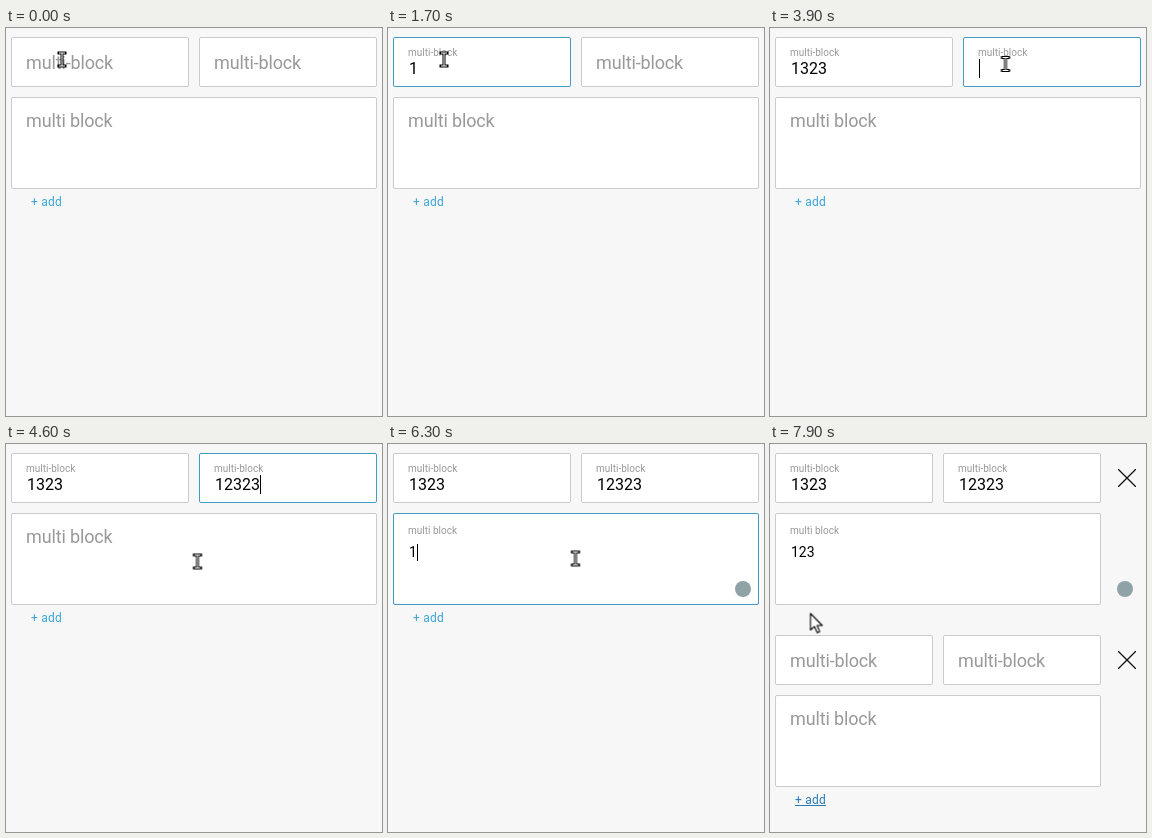
An HTML page for the animation above (8 s loop, 376 px wide and 388 px high).

```html
<!DOCTYPE html>
<html lang="en">
<head>
<meta charset="utf-8">
<title>Multi-block form</title>
<style>
  html, body { margin: 0; width: 100%; height: 100%; overflow: hidden; }
  body { position: relative; background: #f7f7f7; font-family: Roboto, Arial, sans-serif; }

  /* One 8 s clock for everything; states hold unless a keyframe says otherwise. */
  .anim {
    animation: 8s step-end -20ms infinite;
  }

  .block { position: absolute; left: 5px; top: 9px; width: 366px; }
  .block.second { top: 191px; width: 326px; }
  .pair { display: flex; gap: 10px; }
  .field {
    position: relative; flex: 1; box-sizing: border-box; height: 50px;
    background: #fff; border: 1px solid #c8cccc; border-radius: 2px;
  }
  .area { height: 92px; margin-top: 10px; }

  .label {
    position: absolute; left: 14px; top: 15px; line-height: 20px;
    font-size: 18px; letter-spacing: -.14px; white-space: nowrap; color: #999;
  }
  .area .label { top: 13px; }

  /* The typed text is revealed by width; its right border is the caret. */
  .value {
    position: absolute; left: 15px; top: 21px; width: 0; height: 19px;
    overflow: hidden; white-space: nowrap; color: #000;
    font-size: 16px; line-height: 19px; border-right: 1px solid transparent;
  }
  .area .value { top: 30px; height: 17px; font-size: 14px; line-height: 17px; }

  .add {
    position: absolute; left: 25px; top: 164px; line-height: 20px;
    font-size: 12px; letter-spacing: .23px; color: #3ba4d8;
  }
  .badge {
    position: absolute; left: 347px; top: 137px; width: 16px; height: 16px;
    border-radius: 50%; background: #8fa3a6; visibility: hidden;
  }
  .close { position: absolute; left: 343px; top: 16px; width: 18px; height: 18px; }
  .close path { stroke: #111; stroke-width: 1.3; }
  .late { visibility: hidden; animation-name: late; }
  #pointer { position: absolute; left: 0; top: 0; width: 1px; height: 1px; overflow: visible; }
  #pointer path { fill: #fff; stroke: #000; stroke-width: 1.1; stroke-linejoin: round; }
  #ibeam path { fill: none; stroke-width: 3; stroke-linejoin: miter; }
  #ibeam path + path { stroke: #fff; stroke-width: 1; }
  #hand path + path { stroke-width: .8; }

  #form { animation-name: narrow; }
  #first { animation-name: focus1; }
  #first .label { animation-name: float1; }
  #first .value { animation-name: type1; }
  #second { animation-name: focus2; }
  #second .label { animation-name: float2; }
  #second .value { animation-name: type2; }
  #notes { animation-name: focus3; }
  #notes .label { animation-name: float3; }
  #notes .value { animation-name: type3; }
  .badge { animation-name: badge; }
  .add { animation-name: add; }
  #pointer { animation-name: move; }
  #ibeam { animation-name: ibeam; }
  #hand { animation-name: hand; }
  #arrow { animation-name: arrow; }

  @keyframes late { 0% { visibility: hidden } 98.75%, 100% { visibility: visible } }
  @keyframes narrow { 0% { width: 366px } 98.75%, 100% { width: 326px } }
  @keyframes badge { 0% { visibility: hidden } 67.5%, 100% { visibility: visible } }

  @keyframes focus1 {
    0% { border-color: #c8cccc }
    6.25% { border-color: #c8cccc; animation-timing-function: steps(4, start) }
    11.25% { border-color: #419bc5 }
    45% { border-color: #419bc5; animation-timing-function: steps(3, start) }
    48.75%, 100% { border-color: #c8cccc }
  }
  @keyframes focus2 {
    0% { border-color: #c8cccc }
    45% { border-color: #c8cccc; animation-timing-function: steps(4, start) }
    50% { border-color: #419bc5 }
    66.25% { border-color: #419bc5; animation-timing-function: steps(3, start) }
    70%, 100% { border-color: #c8cccc }
  }
  @keyframes focus3 {
    0% { border-color: #c8cccc }
    66.25% { border-color: #c8cccc; animation-timing-function: steps(4, start) }
    71.25% { border-color: #419bc5 }
    98.75%, 100% { border-color: #c8cccc }
  }

  @keyframes float1 {
    0% { top: 15px; font-size: 18px; letter-spacing: -.14px }
    6.25% { top: 15px; font-size: 18px; letter-spacing: -.14px; animation-timing-function: steps(4, start) }
    11.25%, 100% { top: 5px; font-size: 10px; letter-spacing: 0px }
  }
  @keyframes float2 {
    0% { top: 15px; font-size: 18px; letter-spacing: -.14px }
    45% { top: 15px; font-size: 18px; letter-spacing: -.14px; animation-timing-function: steps(4, start) }
    50%, 100% { top: 5px; font-size: 10px; letter-spacing: 0px }
  }
  @keyframes float3 {
    0% { top: 13px; font-size: 18px; letter-spacing: -.14px }
    66.25% { top: 13px; font-size: 18px; letter-spacing: -.14px; animation-timing-function: steps(4, start) }
    71.25%, 100% { top: 7px; font-size: 10px; letter-spacing: 0px }
  }

  /* A digit is .5615em wide. */
  @keyframes type1 {
    0% { width: 0em; border-color: transparent }
    10% { width: 0em; border-color: #000 }
    21.25% { width: .562em; border-color: transparent }
    26.25% { width: 1.123em; border-color: #000 }
    30% { width: 1.685em; border-color: #000 }
    31.25% { width: 2.246em; border-color: #000 }
    35%, 100% { width: 2.246em; border-color: transparent }
  }
  @keyframes type2 {
    0% { width: 0em; border-color: transparent }
    47.5% { width: 0em; border-color: #000 }
    51.25% { width: .562em; border-color: #000 }
    52.5% { width: 1.123em; border-color: #000 }
    53.75% { width: 1.685em; border-color: #000 }
    55% { width: 2.246em; border-color: #000 }
    56.25% { width: 2.808em; border-color: #000 }
    61.25%, 100% { width: 2.808em; border-color: transparent }
  }
  @keyframes type3 {
    0% { width: 0em; border-color: transparent }
    70% { width: 0em; border-color: #000 }
    78.75% { width: .562em; border-color: #000 }
    81.25% { width: 1.123em; border-color: #000 }
    83.75% { width: 1.685em; border-color: #000 }
    87.5%, 100% { width: 1.685em; border-color: transparent }
  }

  @keyframes add {
    0% { top: 164px; color: #3ba4d8; text-decoration: none }
    90% { top: 164px; color: #2a7ab5; text-decoration: underline }
    98.75%, 100% { top: 346px; color: #2a7ab5; text-decoration: underline }
  }

  /* The pointer hides while keys are pressed. */
  @keyframes move {
    0% { transform: translate(56px, 31.5px); opacity: 1 }
    23.75% { transform: translate(56px, 31.5px); opacity: 0 }
    35% { transform: translate(64px, 34px); opacity: 1 }
    36.25% { transform: translate(150px, 45px); opacity: 1 }
    37.5% { transform: translate(235.5px, 36px); opacity: 1 }
    51.25% { transform: translate(235.5px, 36px); opacity: 0 }
    53.75% { transform: translate(222px, 80px); opacity: 1 }
    55% { transform: translate(198px, 116px); opacity: 1 }
    56.25% { transform: translate(193px, 118px); opacity: 1 }
    57.5% { transform: translate(191.5px, 117.5px); opacity: 1 }
    60% { transform: translate(190px, 116.5px); opacity: 1 }
    61.25% { transform: translate(188.5px, 115px); opacity: 1 }
    62.5% { transform: translate(187.5px, 114.5px); opacity: 1 }
    80% { transform: translate(187.5px, 114.5px); opacity: 0 }
    85% { transform: translate(165px, 125px); opacity: 1 }
    86.25% { transform: translate(115px, 143px); opacity: 1 }
    87.5% { transform: translate(64px, 165px); opacity: 1 }
    88.75% { transform: translate(46px, 169px); opacity: 1 }
    90% { transform: translate(42px, 169px); opacity: 1 }
    91.25% { transform: translate(41px, 169.5px); opacity: 1 }
    92.5%, 100% { transform: translate(40.5px, 169.5px); opacity: 1 }
  }
  @keyframes ibeam { 0% { visibility: visible } 87.5%, 100% { visibility: hidden } }
  @keyframes hand {
    0% { visibility: hidden } 90% { visibility: visible } 98.75%, 100% { visibility: hidden }
  }
  @keyframes arrow {
    0% { visibility: hidden } 87.5% { visibility: visible }
    90% { visibility: hidden } 98.75%, 100% { visibility: visible }
  }
</style>
</head>
<body>
  <div class="block anim" id="form">
    <div class="pair">
      <div class="field anim" id="first">
        <span class="label anim">multi-block</span><span class="value anim">1323</span>
      </div>
      <div class="field anim" id="second">
        <span class="label anim">multi-block</span><span class="value anim">12323</span>
      </div>
    </div>
    <div class="field area anim" id="notes">
      <span class="label anim">multi block</span><span class="value anim">123</span>
    </div>
    <svg class="close late anim"><path d="M0 0L18 18M18 0L0 18"/></svg>
  </div>

  <div class="block second late anim">
    <div class="pair">
      <div class="field"><span class="label">multi-block</span></div>
      <div class="field"><span class="label">multi-block</span></div>
    </div>
    <div class="field area"><span class="label">multi block</span></div>
    <svg class="close"><path d="M0 0L18 18M18 0L0 18"/></svg>
  </div>

  <div class="badge anim"></div>
  <span class="add anim">+ add</span>

  <svg id="pointer" class="anim">
    <g id="ibeam" class="anim">
      <path d="M-4.5 -6.5H4.5M0 -6.5V6.5M-4.5 6.5H4.5"/>
      <path d="M-3 -6.5H3M0 -6.5V6.5M-3 6.5H3"/>
    </g>
    <g id="hand" class="anim">
      <path d="M.5 10V1.5q1.5 -2 3 0V6q1.5 -1 2.5 .5q1.5 -1 2.5 .5q1.8 -.8 2.5 1V12l-1.5 4H2.5L-3 10q0 -2.5 3.5 0z"/>
      <path d="M4 10v3M6 10v3M8 10v3"/>
    </g>
    <g id="arrow" class="anim">
      <path d="M0 0V16.5L4 13L6.8 19.2L9.3 18.1L6.6 12H11.8z"/>
    </g>
  </svg>
</body>
</html>
```
